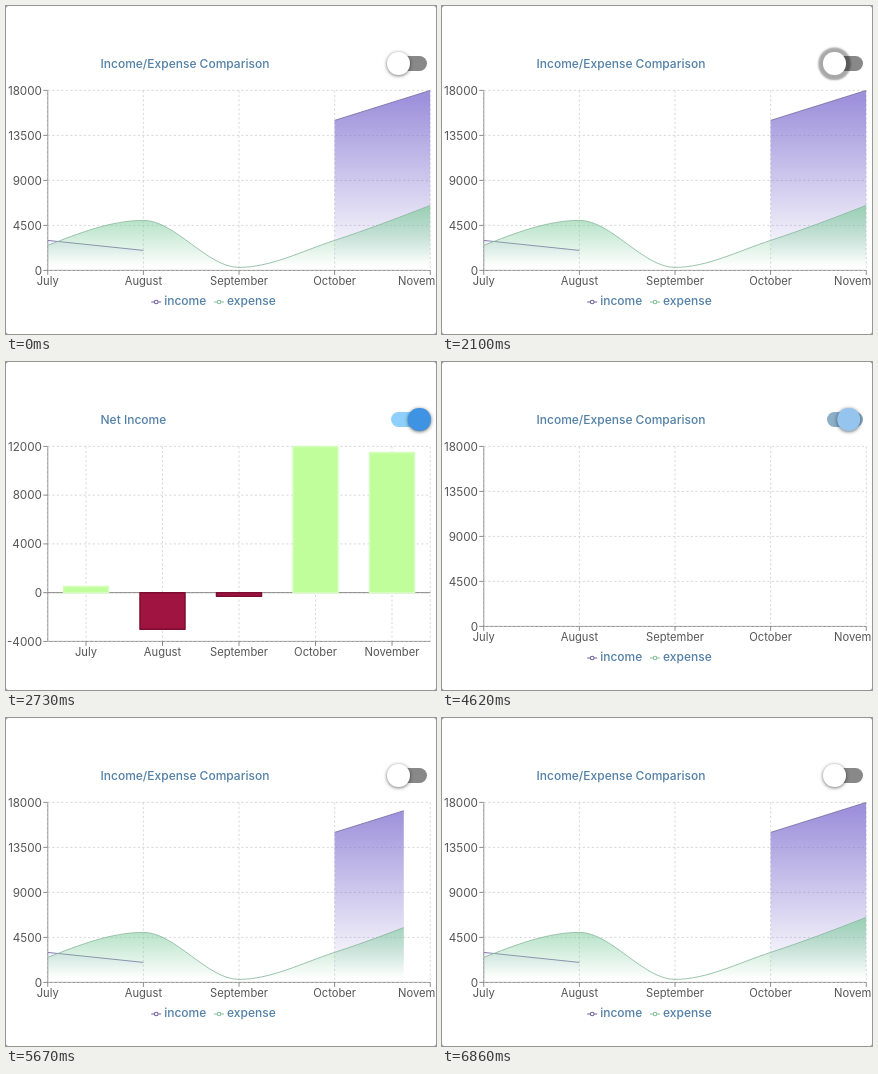
An HTML page for the animation above (7 s loop, 430x328 px).

```html
<!DOCTYPE html>
<html lang="en">
<head>
<meta charset="utf-8">
<title>Income and expense chart</title>
<style>
  html, body { margin: 0; width: 100%; height: 100%; overflow: hidden; background: #8c8c8c; }
  #stage { position: absolute; left: 0; top: 0; width: 430px; height: 328px; overflow: hidden; background: #fff; border-radius: 2.5px; }
  svg { position: absolute; left: 0; top: 0; }
  text { font-family: Inter, Roboto, sans-serif; font-size: 11.2px; fill: #555; }
  .num { font-size: 11.7px; }
  .head { font-size: 12px; font-weight: 500; fill: #5280a6; }
  .grid { stroke: #ccc; stroke-width: .75; stroke-dasharray: 2.25 2.25; }
  .axis { stroke: #666; stroke-width: .75; }
  .track, .thumb { position: absolute; }
  .track { left: 385.25px; top: 50px; width: 36px; height: 15px; border-radius: 7.5px; }
  .thumb { left: 381.25px; top: 46.25px; width: 22.5px; height: 22.5px; border-radius: 50%; }
</style>
</head>
<body>
<div id="stage">
  <svg width="430" height="328" viewBox="0 0 430 328">
    <defs>
      <linearGradient id="incomeFill" x1="0" y1="0" x2="0" y2="1">
        <stop offset="5%" stop-color="#8676d2" stop-opacity=".8"/>
        <stop offset="95%" stop-color="#8676d2" stop-opacity="0"/>
      </linearGradient>
      <linearGradient id="expenseFill" x1="0" y1="0" x2="0" y2="1">
        <stop offset="5%" stop-color="#82cd9f" stop-opacity=".72"/>
        <stop offset="95%" stop-color="#82cd9f" stop-opacity="0"/>
      </linearGradient>
      <clipPath id="reveal"><rect id="wipe" x="41.25" y="70" height="210"/></clipPath>
    </defs>
    <g id="areaView"></g>
    <g id="barView"></g>
  </svg>
  <div class="track" id="track"></div>
  <div class="thumb" id="thumb"></div>
</div>
<script>
const LOOP = 7000;
const PRESS = 2045, TURN_ON = 2220, BARS_START = 2305;
const TURN_OFF = 4568, AREA_START = 4655;

const months = ['July', 'August', 'September', 'October', 'November'];
const income = [3000, 2000, null, 15000, 18000];
const expense = [2500, 5000, 300, 3000, 6500];
const LEFT = 41.75, WIDTH = 382.5, RIGHT = LEFT + WIDTH, TOP = 84.4;

const $ = id => document.getElementById(id);

function add(parent, tag, attrs, content) {
  const node = document.createElementNS('http://www.w3.org/2000/svg', tag);
  for (const key in attrs) node.setAttribute(key, attrs[key]);
  if (content !== undefined) node.textContent = content;
  parent.appendChild(node);
  return node;
}

const line = (g, cls, x1, y1, x2, y2) => add(g, 'line', { class: cls, x1, y1, x2, y2 });
const label = (g, x, y, str, anchor = 'middle', cls = '') =>
  add(g, 'text', { x, y, class: cls, 'text-anchor': anchor }, str);

function drawFrame(g, title, yTicks, yOf, xTicks) {
  const bottom = yOf(yTicks[0]);
  label(g, 94.5, 62.2, title, 'start', 'head');
  line(g, 'axis', LEFT, TOP, LEFT, bottom);
  line(g, 'axis', LEFT, bottom, RIGHT, bottom);
  for (const v of yTicks) {
    const y = yOf(v);
    line(g, 'grid', LEFT, y, RIGHT, y);
    line(g, 'axis', LEFT - 4.5, y, LEFT, y);
    label(g, 36, y + 4.2, v, 'end', 'num');
  }
  for (const x of new Set([LEFT, ...xTicks, RIGHT])) line(g, 'grid', x, TOP, x, bottom);
  xTicks.forEach((x, i) => {
    line(g, 'axis', x, bottom, x, bottom + 4.5);
    // The last label is pushed inwards when its tick sits on the right edge
    if (x === RIGHT) label(g, 392, bottom + 14.6, months[i], 'start');
    else label(g, x, bottom + 14.6, months[i]);
  });
}

// Monotone cubic through evenly spaced points
function monotone(points) {
  const n = points.length, h = points[1][0] - points[0][0];
  const slope = points.slice(1).map((p, i) => (p[1] - points[i][1]) / h);
  const tan = points.map((_, i) => {
    const a = slope[i - 1], b = slope[i];
    if (i === 0 || i === n - 1) return 0;
    return (Math.sign(a) + Math.sign(b)) * Math.min(Math.abs(a), Math.abs(b), Math.abs(a + b) / 4);
  });
  tan[0] = (3 * slope[0] - tan[1]) / 2;
  tan[n - 1] = (3 * slope[n - 2] - tan[n - 2]) / 2;
  let d = 'M' + points[0];
  for (let i = 1; i < n; i++) {
    const [x0, y0] = points[i - 1], [x1, y1] = points[i], k = h / 3;
    d += `C${[x0 + k, y0 + k * tan[i - 1], x1 - k, y1 - k * tan[i], x1, y1]}`;
  }
  return d;
}

function buildAreas() {
  const g = $('areaView');
  const yOf = v => TOP + 180 - v / 100;
  const xs = months.map((_, i) => LEFT + WIDTH * i / 4);
  drawFrame(g, 'Income/Expense Comparison', [0, 4500, 9000, 13500, 18000], yOf, xs);

  const plot = add(g, 'g', { 'clip-path': 'url(#reveal)' });
  const at = (data, i) => [xs[i], yOf(data[i])];
  const close = (d, from, to) => `${d}L${xs[to]},${yOf(0)}L${xs[from]},${yOf(0)}Z`;
  const early = `M${at(income, 0)}L${at(income, 1)}`;
  const late = `M${at(income, 3)}L${at(income, 4)}`;
  const curve = monotone(expense.map((_, i) => at(expense, i)));
  const area = (fill, shape, stroke, top) => {
    add(plot, 'path', { d: shape, fill: `url(#${fill})` });
    add(plot, 'path', { d: top, fill: 'none', stroke, 'stroke-width': .8 });
  };
  area('incomeFill', close(early, 0, 1) + close(late, 3, 4), '#70629c', early + late);
  area('expenseFill', close(curve, 0, 4), '#85b598', curve);

  const legend = (x, color, name) => {
    add(g, 'path', { d: `M${x - 5},296h3.2M${x + 1.8},296h3.2`, stroke: color, 'stroke-width': 1.2 });
    add(g, 'circle', { cx: x, cy: 296, r: 1.8, fill: 'none', stroke: color, 'stroke-width': 1.1 });
    label(g, x + 8, 299.3, name, 'start', 'head');
  };
  legend(150.2, '#70629c', 'income');
  legend(213, '#85c19b', 'expense');
}

const zeroY = TOP + 195 * .75;

function buildBars() {
  const g = $('barView');
  const yOf = v => zeroY - v * 195 / 16000;
  const xs = months.map((_, i) => LEFT + WIDTH * (i + .5) / 5);
  drawFrame(g, 'Net Income', [-4000, 0, 4000, 8000, 12000], yOf, xs);
  line(g, 'axis', LEFT, zeroY, RIGHT, zeroY);
  return xs.map((x, i) => {
    const net = expense[i] === null ? 0 : (income[i] || 0) - expense[i];
    const gain = net > 0;
    const node = add(g, 'rect', {
      x: x - 22.5, width: 45, 'stroke-width': 1.5, 'stroke-linejoin': 'round',
      fill: gain ? '#c0fe9b' : '#a01441', stroke: gain ? '#d6fdbf' : '#7c0c31'
    });
    return { node, rise: zeroY - yOf(net) };
  });
}

buildAreas();
const bars = buildBars();

const clamp = v => Math.min(1, Math.max(0, v));

// cubic-bezier(.25, .1, .25, 1)
function ease(p) {
  p = clamp(p);
  if (p === 0 || p === 1) return p;
  let lo = 0, hi = 1, u = p;
  for (let i = 0; i < 24; i++) {
    const x = .75 * u * (1 - u) + u * u * u;
    if (x < p) lo = u; else hi = u;
    u = (lo + hi) / 2;
  }
  return .3 * u * (1 - u) ** 2 + 3 * u * u * (1 - u) + u ** 3;
}

const mix = (a, b, k) => a + (b - a) * k;
const blend = (a, b, k) => `rgb(${a.map((v, i) => Math.round(mix(v, b[i], k)))})`;

function drawSwitch(t) {
  const turningOff = t >= TURN_OFF;
  const slide = ease((t - (turningOff ? TURN_OFF : TURN_ON)) / 250);
  const on = turningOff ? 1 - slide : slide;
  const tint = turningOff ? 1 - slide ** .7 : slide ** .7;
  const glow = t < TURN_ON ? ease((t - PRESS) / 150) : 1 - ease((t - TURN_ON) / 150);
  $('track').style.background = blend([136, 136, 136], [142, 208, 251], tint);
  const thumb = $('thumb').style;
  thumb.background = blend([255, 255, 255], [62, 147, 226], tint);
  thumb.transform = `translateX(${21 * on}px)`;
  thumb.boxShadow = `0 ${mix(.75, 0, glow)}px ${mix(3.75, .75, glow)}px ${7.5 * glow}px rgba(0,0,0,${mix(.6, .2, glow)})`;
}

function draw(t) {
  const showBars = t >= TURN_ON && t < TURN_OFF;
  $('barView').style.display = showBars ? '' : 'none';
  $('areaView').style.display = showBars ? 'none' : '';

  const shown = t < TURN_ON ? 1 : ease((t - AREA_START) / 1500);
  $('wipe').setAttribute('width', .75 + WIDTH * shown);

  const grown = ease((t - BARS_START) / 400);
  for (const { node, rise } of bars) {
    const h = rise * grown;
    node.setAttribute('y', Math.min(zeroY, zeroY - h));
    node.setAttribute('height', Math.abs(h));
  }
  drawSwitch(t);
}

const begin = performance.now();
function tick() {
  draw((performance.now() - begin) % LOOP);
  requestAnimationFrame(tick);
}
tick();
</script>
</body>
</html>
```
